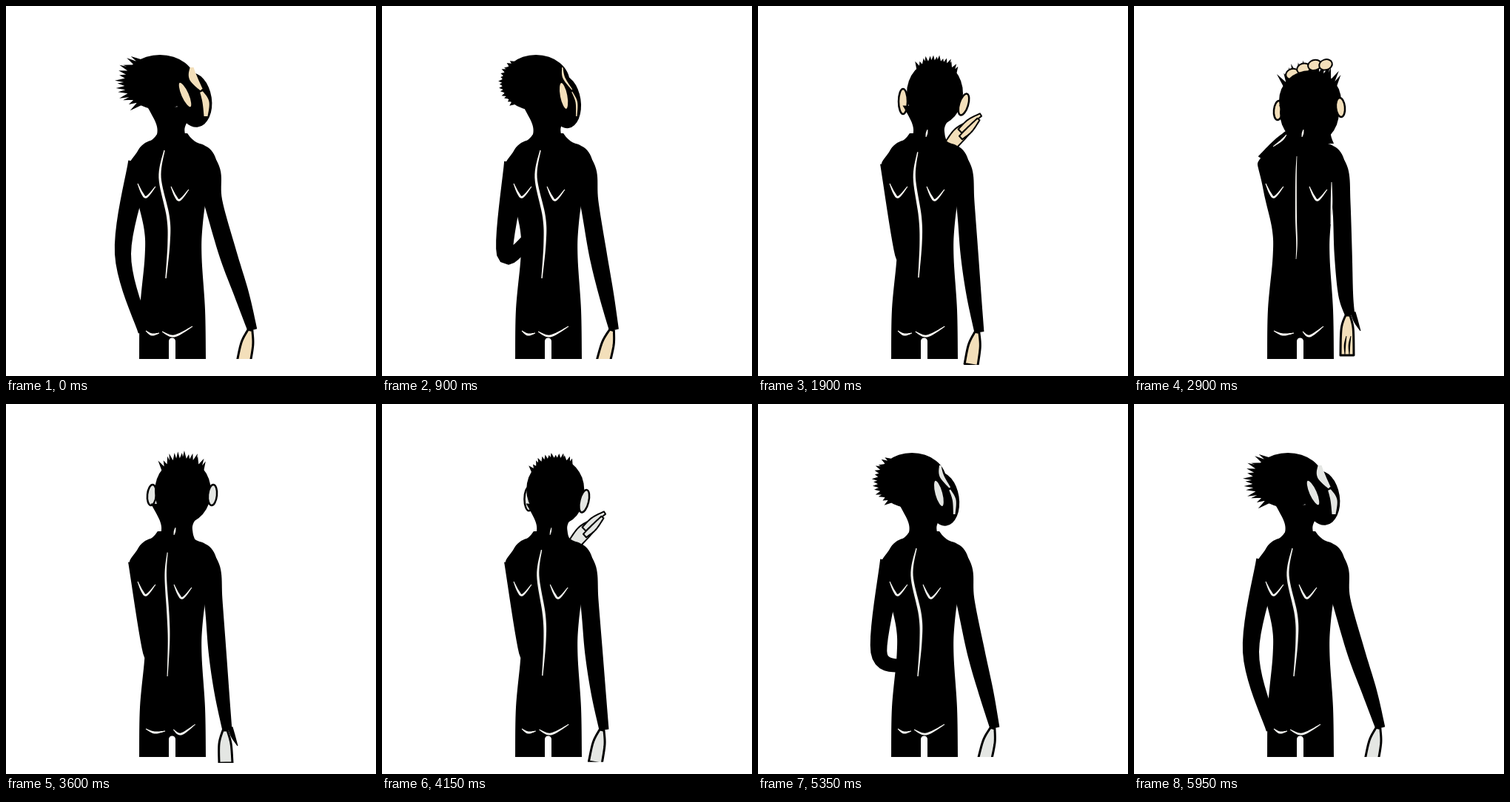
Animation of 500x500 px, one loop 6000 ms. Source, as an HTML page with a canvas:

```html
<!DOCTYPE html>
<html lang="en">
<head>
<meta charset="utf-8">
<title>Turning figure</title>
<style>
html, body { margin: 0; width: 100%; height: 100%; overflow: hidden; background: #fff; }
canvas { display: block; width: 500px; height: 500px; }
</style>
</head>
<body>
<canvas id="stage" width="500" height="500"></canvas>
<script>
const ctx = document.getElementById('stage').getContext('2d');
const LOOP = 6000, STEP = 50, INK = '#000';

// wrist: x, y, lean of the hand; ovals: x, y, rx, ry; ears: x, y, ry, tilt;
// hair: middle angle, spread, length; back: spine bow, spine end, blade x, seat gap.
const profile = {
  wrist: [333, 438, -10], skull: [208, 103, 48, 37], face: [254, 127, 24, 37], neck: [223, 38],
  earRight: [242, 120, 19, -.42], earLeft: [212, 125, 10, 0],
  hair: [Math.PI, .95, 15], back: [1, 368, 235, 0]
};
const turned = {
  ...profile,
  wrist: [306, 438, -14], skull: [208, 104, 45, 38], face: [244, 130, 21, 36],
  earRight: [247, 122, 19, -.1], hair: [Math.PI, .8, 4]
};
const away = {
  ...turned,
  wrist: [299, 441, -9], skull: [239, 118, 38, 44], face: [238, 122, 36, 40], neck: [231, 43],
  earRight: [278, 133, 15, .3], earLeft: [196, 129, 17, 0],
  hair: [Math.PI * 1.53, .75, 10], back: [.7, 367, 240, .1]
};
const upright = {
  ...away,
  wrist: [299, 441, 0], earRight: [279, 123, 14, .1], earLeft: [197, 123, 14, .1],
  hair: [Math.PI * 1.5, .8, 13], back: [.3, 368, 239, .9]
};
const scratching = {
  ...upright,
  wrist: [292, 418, -2], skull: [238, 128, 42, 41], face: [237, 144, 40, 43], neck: [238, 56],
  earRight: [279, 137, 13, -.1], earLeft: [195, 141, 13, .1],
  hair: [Math.PI * 1.5, 1, 17], back: [0, 342, 249, 1]
};
const poses = [profile, turned, away, upright, scratching];
const poseTimes = [0, 1250, 1900, 2350, 2900];

const lerp = (a, b, k) => a + (b - a) * k;
const clamp01 = v => Math.min(1, Math.max(0, v));
const ramp = (t, from, to) => clamp01((t - from) / (to - from));

function poseAt(t) {
  let i = 0;
  while (i < 3 && t >= poseTimes[i + 1]) i++;
  const k = ramp(t, poseTimes[i], poseTimes[i + 1]);
  const pose = {};
  for (const part in profile) {
    pose[part] = poses[i][part].map((v, j) => lerp(v, poses[i + 1][part][j], k));
  }
  return pose;
}

function spline(a, b, c, d, u) {
  return b + .5 * u * (c - a + u * (2 * a - 5 * b + 4 * c - d + u * (3 * (b - c) + d - a)));
}

// Smooth band through points of x, y, width.
function ribbon(points, color, outline = 0) {
  const last = points.length - 1, steps = 10, mid = [];
  const at = i => points[Math.min(last, Math.max(0, i))];
  for (let s = 0; s <= last * steps; s++) {
    const i = Math.min(last - 1, Math.floor(s / steps)), u = s / steps - i;
    mid.push([0, 1, 2].map(n => spline(at(i - 1)[n], at(i)[n], at(i + 1)[n], at(i + 2)[n], u)));
  }
  const edge = side => mid.map(([x, y, w], i) => {
    const p = mid[Math.max(0, i - 1)], q = mid[Math.min(mid.length - 1, i + 1)];
    const dx = q[0] - p[0], dy = q[1] - p[1], k = side * w / 2 / (Math.hypot(dx, dy) || 1);
    return [x - dy * k, y + dx * k];
  });
  ctx.beginPath();
  for (const [x, y] of [...edge(1), ...edge(-1).reverse()]) ctx.lineTo(x, y);
  ctx.closePath();
  paint(color, outline);
}

function oval(x, y, rx, ry, tilt, color, outline = 0) {
  ctx.beginPath();
  ctx.ellipse(x, y, rx, ry, tilt, 0, Math.PI * 2);
  paint(color, outline);
}

function paint(color, outline) {
  ctx.fillStyle = color;
  ctx.fill();
  if (!outline) return;
  ctx.lineWidth = outline;
  ctx.strokeStyle = INK;
  ctx.stroke();
}

// Brush line, thin at both ends.
function brush(points, width, color) {
  const last = points.length - 1;
  ribbon(points.map(([x, y], i) => [x, y, width * (.35 + .65 * Math.sin(Math.PI * i / last))]), color);
}

function drawRightArm({ wrist: [x, y, lean] }, t, skin) {
  const swing = x - 295, grip = ramp(t, 2350, 2900);
  ribbon([[260, 200, 30], [273, 225, 34], [280, 265, 25], [284 + swing * .42, 335, 24],
    [288.5 + swing * .79, 390, 20], [x, y, 13]], INK);
  ctx.save();
  ctx.beginPath();
  ctx.rect(0, 0, 500, lerp(477, 485, ramp(t, 1250, 1900)));
  ctx.clip();
  const tip = x - 2 + lean, end = y + lerp(44, 54, grip);
  ribbon([[x - 3, y, 6], [x - 3 + lean * .4, y + 18, 16], [tip, end, 18]], skin, 3);
  for (const side of [-3, 3]) {
    brush([[tip + side, end], [tip + side, end - 14], [tip + side + 2, end - 26]], 2.5 * grip, INK);
  }
  const thumb = ramp(t, 1900, 2350);
  ribbon([[x + 4, y - 4, 7 * thumb], [x + 8, y + 8, 6 * thumb], [x + 14, y + 21, thumb]], INK);
  ctx.restore();
}

function drawLeftArm(t) {
  const fold = ramp(t, 0, 900), tuck = ramp(t, 900, 1300), raise = ramp(t, 2350, 2800);
  const elbow = [lerp(lerp(158, 166, fold), 196, tuck), lerp(335, 190, raise)];
  const hand = [lerp(187, 215, Math.max(fold * .5, raise)), lerp(lerp(440, 312, fold), 172, raise)];
  ribbon([[181, 212, 32], [...elbow, 22], [...hand, 17]], INK);
}

function drawTorso() {
  ribbon([[225, 172, 40], [225, 181, 56], [225, 191, 90], [226, 214, 118], [224, 250, 98],
    [226, 300, 79], [226, 340, 77], [225, 410, 88], [225, 477, 90]], INK);
  ctx.beginPath();
  ctx.moveTo(224.5, 453);
  ctx.lineTo(224.5, 485);
  ctx.lineWidth = 9;
  ctx.lineCap = 'round';
  ctx.strokeStyle = '#fff';
  ctx.stroke();
}

function drawHair([cx, cy, rx, ry], [middle, spread, length]) {
  const count = 14;
  let seed = 7;
  const random = () => (seed = seed * 16807 % 2147483647) / 2147483647;
  ctx.beginPath();
  for (let i = 0; i < count; i++) {
    const angle = middle + spread * (2 * i / (count - 1) - 1);
    const lean = lerp(middle, angle, .45) + (random() - .5) * .4;
    const reach = length * (.65 + .5 * random());
    const root = a => [cx + (rx - 2) * Math.cos(a), cy + (ry - 2) * Math.sin(a)];
    const [x, y] = root(angle);
    ctx.moveTo(...root(angle - .09));
    ctx.lineTo(x + reach * Math.cos(lean), y + reach * Math.sin(lean));
    ctx.lineTo(...root(angle + .09));
  }
  paint(INK, 0);
}

function drawHead(p, t, skin) {
  const [neckX, neckWidth] = p.neck;
  drawHair(p.skull, p.hair);
  drawFingers(t, skin);
  const [earX, earY, earSize, earTilt] = p.earLeft;
  oval(earX, earY, 6, earSize, earTilt, skin, 2.5);
  ribbon([[neckX + 1, 136, neckWidth + 30], [neckX, 160, neckWidth + 2],
    [neckX, 174, neckWidth], [neckX, 186, neckWidth + 8]], INK);
  oval(...p.skull, 0, INK);
  oval(...p.face, -.15 * (1 - ramp(t, 1250, 1900)), INK);
  const [x, y, size, tilt] = p.earRight;
  oval(x, y, 6, size, tilt, skin, 2.5);

  const turn = 1 - ramp(t, 0, 1250), shift = (turn - 1) * 10;
  if (!turn) return;
  ribbon([[251 + shift, 83, 5 * turn], [253 + shift, 97, 11 * turn], [264 + shift, 113, 4 * turn]], skin);
  ribbon([[264 + shift, 116, 4 * turn], [270 + shift, 130, 9 * turn], [270 + shift, 149, 5 * turn]], skin);
}

function drawFingers(t, skin) {
  const drop = 30 * (1 - ramp(t, 2450, 2800));
  if (drop === 30) return;
  for (let i = 0; i < 4; i++) {
    oval(214 + 15 * i, 92 - 13 * Math.sin(i * .6) + drop, 9, 7, -.3, skin, 2);
  }
}

function drawReachingHand(t, skin) {
  const out = ramp(t, 1500, 1800) * (1 - ramp(t, 2000, 2250));
  if (!out) return;
  ctx.save();
  ctx.translate(-42 * (1 - out), 45 * (1 - out));
  ribbon([[258, 191, 16], [272, 174, 19], [285, 163, 14]], skin, 2);
  ribbon([[273, 169, 7], [286, 157, 8], [301, 147, 4]], skin, 2);
  ribbon([[274, 178, 6], [286, 167, 8], [298, 153, 4]], skin, 2);
  ctx.restore();
}

function drawBackLines([bow, end, blade, gap], t, light) {
  brush([[220 - 6 * bow, 203 - 8 * bow], [219 - 11 * bow, 232], [219, 285],
    [220, 320], [219 - 3 * bow, end]], lerp(2, 4, clamp01(bow * 2)), light);
  for (const [x, y] of [[190, 258], [blade, 262]]) {
    brush([[x - 12, y - 18], [x - 6, y - 5], [x, y], [x + 12, y - 14]], 3, light);
  }
  const left = 207 + 9 * gap, right = 211 + 17 * gap;
  brush([[189, 439], [lerp(189, left, .45), 444], [left, 442]], 3, light);
  brush([[right, 440], [lerp(right, 252, .4), 446], [252 + 4 * gap, 433]], 3, light);

  const nape = ramp(t, 1500, 1900), strain = ramp(t, 2350, 2900);
  brush([[229, 167], [228, 172], [227, 177]], 2.5 * nape, light);
  brush([[267, 238], [267, 266], [266, 295]], 2.5 * strain, light);
  brush([[206, 174], [200, 181], [188, 190]], 2.5 * strain, light);
}

function draw(now) {
  const time = Math.floor(now % LOOP / STEP) * STEP;
  const returning = time >= LOOP / 2;
  const t = returning ? LOOP - STEP - time : time;
  const skin = returning ? '#e4e6e3' : '#f3dfba';
  const light = returning ? '#f4f5f1' : '#fffdf8';
  const pose = poseAt(t);

  ctx.fillStyle = '#fff';
  ctx.fillRect(0, 0, 500, 500);
  ctx.lineJoin = 'round';
  drawReachingHand(t, skin);
  drawRightArm(pose, t, skin);
  drawLeftArm(t);
  drawTorso();
  drawHead(pose, t, skin);
  drawBackLines(pose.back, t, light);
}

const start = performance.now();
function tick() {
  draw(performance.now() - start);
  requestAnimationFrame(tick);
}
tick();
</script>
</body>
</html>
```
